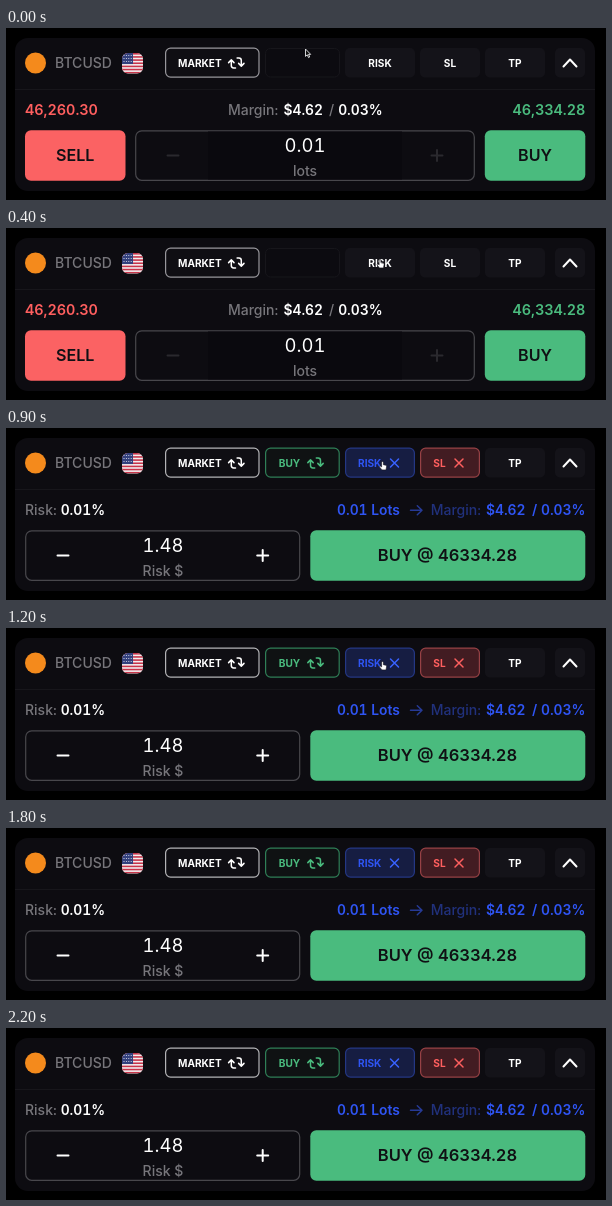
An HTML page for the animation above (2.3 s loop, 600 by 172 pixels).

```html
<!DOCTYPE html>
<html lang="en">
<head>
<meta charset="utf-8">
<title>Order panel</title>
<style>
  html, body { margin: 0; width: 100%; height: 100%; overflow: hidden; background: #000; }
  svg { display: block; width: 600px; height: 172px; }
  text {
    font: 600 13.8px Inter, "Liberation Sans", sans-serif;
    font-variant-numeric: tabular-nums;
    fill: #fff;
    white-space: pre;
  }
  .mid { text-anchor: middle; }
  .end { text-anchor: end; }
  .price { font-size: 14.4px; }
  .small { font-size: 10.1px; font-weight: 700; }
  .gray { fill: #77767b; font-size: 14px; font-weight: 500; }
  .action { font-size: 16.1px; fill: #101014; }
  .order { font-size: 16.5px; }
  .value { font-size: 18.5px; font-weight: 400; }
  .red { fill: #ff5f5f; }
  .green { fill: #4abb7e; }
  .blue { fill: #2f55f4; }
  .navy { fill: #21317c; font-size: 14px; font-weight: 500; }
  .chip { fill: #141319; }
  .line { fill: none; stroke: currentColor; stroke-width: 1.5; stroke-linecap: round; stroke-linejoin: round; }
  .box { fill: #0d0c11; stroke: #48474c; stroke-width: 1.2; }
</style>
</head>
<body>
<svg viewBox="0 0 600 172">
  <defs>
    <clipPath id="flagClip"><rect x="116" y="25" width="21" height="20.5" rx="6"/></clipPath>
    <g id="swap" class="line">
      <path id="half" d="M.8 -5H2.6Q5 -5 5 -2.6V3M2.3 .4L5 3.1L7.7 .4"/>
      <use href="#half" transform="rotate(180)"/>
    </g>
    <path id="cross" class="line" d="M-4 -4L4 4M4 -4L-4 4"/>
    <path id="minus" class="line" style="stroke-width:2" d="M-5.5 0H5.5"/>
    <path id="plus" class="line" style="stroke-width:2" d="M-5.5 0H5.5M0 -5.5V5.5"/>
  </defs>

  <rect x="9" y="10" width="580" height="153" rx="13" fill="#0d0c11"/>
  <path d="M9 61.5H589" stroke="#17161b"/>

  <circle cx="29.5" cy="35" r="10.5" fill="#f48a1c"/>
  <text class="gray" x="49" y="40">BTCUSD</text>
  <g id="flag" clip-path="url(#flagClip)">
    <rect x="116" y="25" width="21" height="21" fill="#f1eef0"/>
  </g>

  <rect id="market" x="159.6" y="20.1" width="93.4" height="29" rx="5" fill="#0f0e13" stroke-width="1.2"/>
  <text class="small" x="172" y="38.5">MARKET</text>
  <use href="#swap" x="230.3" y="35" color="#fff"/>

  <rect class="chip" x="479" y="20" width="60" height="29.5" rx="5"/>
  <text class="small mid" x="509" y="38.5">TP</text>
  <rect class="chip" x="549" y="20" width="30" height="29.5" rx="5"/>
  <path class="line" color="#fff" style="stroke-width:2" d="M557.5 38.5L564 31.5L570.5 38.5"/>

  <g id="lots">
    <rect x="259.5" y="20.5" width="74" height="28.5" rx="5" fill="#0c0b10" stroke="#17161b"/>
    <rect class="chip" x="339" y="20" width="70" height="29.5" rx="5"/>
    <text class="small mid" x="374" y="38.5">RISK</text>
    <rect class="chip" x="414" y="20" width="60" height="29.5" rx="5"/>
    <text class="small mid" x="444" y="38.5">SL</text>

    <text class="price red" x="19" y="87.3">46,260.30</text>
    <text class="gray" x="222" y="87.3">Margin:</text>
    <text x="277.5" y="87.3">$4.62</text>
    <text class="gray" x="323" y="87.3">/</text>
    <text class="end" x="376.5" y="87.3">0.03%</text>
    <text class="price green end" x="579.3" y="87.3">46,334.28</text>

    <rect x="19" y="102.3" width="100.5" height="50.5" rx="6" fill="#fb6263"/>
    <text class="action mid" x="69.2" y="133.4">SELL</text>
    <rect class="box" x="129.7" y="102.9" width="338.6" height="49.4" rx="6"/>
    <path d="M202 103.6H396V151.6H202Z" fill="#0a090e"/>
    <use href="#minus" x="167" y="127.5" color="#2a292e"/>
    <use href="#plus" x="431" y="127.5" color="#2a292e"/>
    <text class="value mid" x="299" y="124.3">0.01</text>
    <text class="gray mid" x="299" y="147.6">lots</text>
    <rect x="478.8" y="102.3" width="100.5" height="50.5" rx="6" fill="#4abb7e"/>
    <text class="action mid" x="529" y="133.4">BUY</text>
  </g>

  <g id="risk">
    <rect x="259.6" y="20.1" width="73.6" height="29" rx="5" fill="#0f1213" stroke="#2f7f57" stroke-width="1.2"/>
    <text class="small green" x="272.8" y="38.5">BUY</text>
    <use href="#swap" x="309.5" y="35" color="#4abb7e"/>
    <rect x="339.6" y="20.1" width="68.8" height="29" rx="5" fill="#161d42" stroke="#243784" stroke-width="1.2"/>
    <text class="small blue" x="352" y="38.5">RISK</text>
    <use href="#cross" x="388.5" y="35" color="#3a63ff"/>
    <rect x="414.6" y="20.1" width="58.8" height="29" rx="5" fill="#421c22" stroke="#964145" stroke-width="1.2"/>
    <text class="small red" x="427.3" y="38.5">SL</text>
    <use href="#cross" x="453" y="35" color="#ff5f5f"/>

    <text class="gray" x="19" y="87.3">Risk:</text>
    <text x="54.7" y="87.3">0.01%</text>
    <text class="blue" x="331" y="87.3">0.01 Lots</text>
    <path class="line" color="#263a96" d="M404.5 82.3H416M411.3 77.8L416 82.3L411.3 86.8"/>
    <text class="navy" x="424.7" y="87.3">Margin:</text>
    <text class="blue" x="480" y="87.3">$4.62</text>
    <text class="blue" x="526" y="87.3">/</text>
    <text class="blue end" x="579.3" y="87.3">0.03%</text>

    <rect class="box" x="19.7" y="102.9" width="274" height="49.4" rx="6"/>
    <use href="#minus" x="57" y="127.5" color="#fff"/>
    <use href="#plus" x="256.7" y="127.5" color="#fff"/>
    <text class="value mid" x="157" y="124.3">1.48</text>
    <text class="gray mid" x="157" y="147.6">Risk $</text>
    <rect x="304.3" y="102.3" width="275" height="50.5" rx="6" fill="#4abb7e"/>
    <text class="action order mid" x="441.5" y="133.4">BUY @ 46334.28</text>
  </g>

  <g id="cursor" stroke="#e8e8ea" stroke-width=".9" stroke-linejoin="round">
    <path id="arrow" fill="#111" d="M0 0V7.4L1.8 5.8L3 8.6L4.2 8L3 5.4H5.2Z"/>
    <path id="hand" fill="#fff" stroke="#15141a" stroke-width=".6" d="M-.9 -3.6Q0 -4.6 .9 -3.6V-.8L3.4 -.2Q4.2 .1 4.1 1L3.5 4.4H-.5L-3 1.4Q-3 .3 -1.8 .7L-.9 1.4Z"/>
  </g>
</svg>
<script>
  const LOOP = 2300, STEP = 100, SWITCH = 900, LEAVE = 1600;
  // time, x, y of the pointer
  const path = [[0, 299.5, 21], [100, 314, 24], [200, 340, 29], [300, 364, 34],
                [400, 374, 35.5], [600, 375.5, 36.5], [800, 376.5, 37.5]];
  const get = id => document.getElementById(id);
  const show = (id, on) => get(id).style.display = on ? "" : "none";

  function drawFlag() {
    const add = (tag, attrs) => {
      const el = document.createElementNS("http://www.w3.org/2000/svg", tag);
      for (const key in attrs) el.setAttribute(key, attrs[key]);
      get("flag").append(el);
    };
    const h = 20.5 / 13;
    for (let i = 0; i < 13; i += 2)
      add("rect", { x: 116, y: 25 + i * h, width: 21, height: h, fill: "#c8354a" });
    add("rect", { x: 116, y: 25, width: 11, height: h * 7, fill: "#34417d" });
    for (let i = 0; i < 12; i++)
      add("circle", { cx: 118 + i % 4 * 2.4, cy: 27.5 + Math.floor(i / 4) * 3, r: .55, fill: "#e4e5ef" });
  }

  function pointerAt(t) {
    const i = path.findIndex(p => p[0] > t);
    if (i < 0) return path[path.length - 1].slice(1);
    const a = path[i - 1], b = path[i], k = (t - a[0]) / (b[0] - a[0]);
    return [a[1] + (b[1] - a[1]) * k, a[2] + (b[2] - a[2]) * k];
  }

  function render(now) {
    const t = Math.floor(now % LOOP / STEP) * STEP;
    const open = t >= SWITCH;
    const [x, y] = pointerAt(t);
    show("lots", !open);
    show("risk", open);
    get("market").setAttribute("stroke", open ? "#b4b4b7" : "#98979c");
    show("cursor", t < LEAVE);
    show("arrow", x < 339);
    show("hand", x >= 339);
    get("cursor").setAttribute("transform", `translate(${x} ${y})`);
  }

  function tick() {
    render(performance.now());
    requestAnimationFrame(tick);
  }

  drawFlag();
  tick();
</script>
</body>
</html>
```
